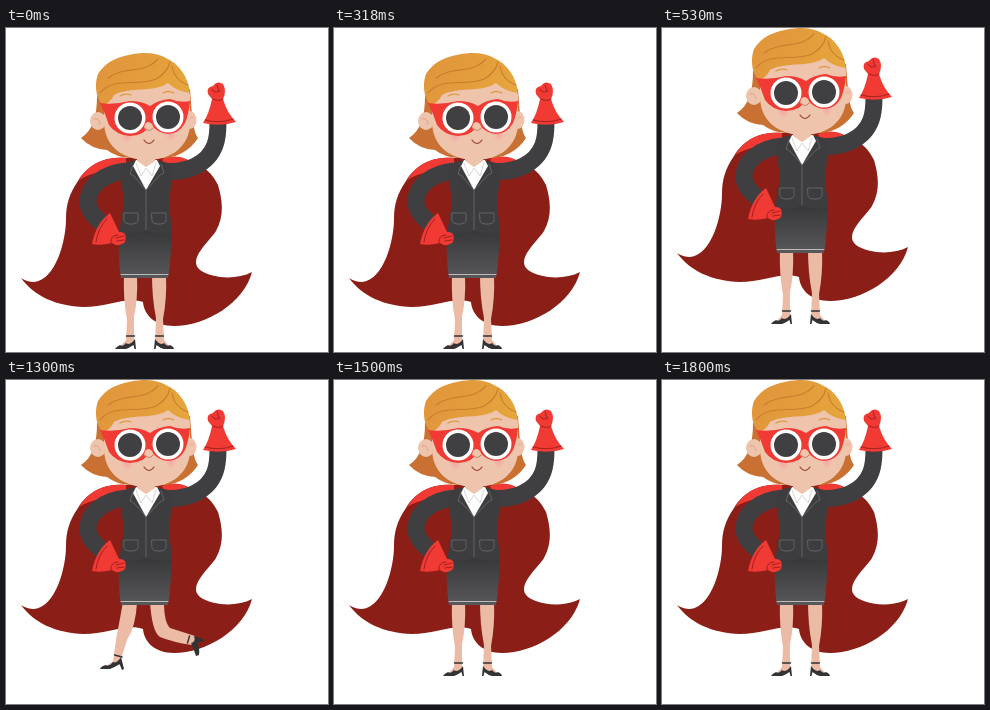
An HTML page without scripts for the animation above (2000 ms loop, 322 by 324 pixels).

```html
<!DOCTYPE html>
<html lang="en">
<head>
<meta charset="utf-8">
<title>Caped heroine</title>
<style>
  html, body { margin: 0; width: 100%; height: 100%; overflow: hidden; background: #fff; }
  svg { display: block; width: 322px; height: 324px; }
  .hero { animation: jump 2s step-end infinite; }
  .stand { animation: stand 2s step-end infinite; }
  .stride { animation: stride 2s step-end infinite; }
  @keyframes jump { 0% { transform: translateY(25px); } 26.5%, 100% { transform: none; } }
  @keyframes stand { 0%, 75%, 100% { visibility: visible; } 50% { visibility: hidden; } }
  @keyframes stride { 0%, 75%, 100% { visibility: hidden; } 50% { visibility: visible; } }
  .skin { fill: #efc4ac; }
  .leg { fill: #ecbba6; }
  .suit { fill: #3d3d3f; }
  .shoe { fill: #333335; }
  .red { fill: #f03a33; }
  .sleeve { fill: none; stroke: #3f3f41; stroke-width: 17; }
  .line { fill: none; stroke-linecap: round; stroke-linejoin: round; }
  .seam { stroke: #6c6c6f; stroke-width: .8; }
  .fold { stroke: #a3211f; stroke-width: 1; }
  .strand { stroke: #c97d2c; stroke-width: 1.1; }
  .strap { stroke: #333335; stroke-width: 1.4; }
</style>
</head>
<body>
<svg viewBox="0 0 322 324">
  <defs>
    <linearGradient id="skirt" x2="0" y2="1">
      <stop offset=".1" stop-color="#39393b"/>
      <stop offset="1" stop-color="#58585a"/>
    </linearGradient>
    <linearGradient id="hair" x2="1" y2=".3">
      <stop stop-color="#e0933c"/>
      <stop offset="1" stop-color="#e5a43c"/>
    </linearGradient>
    <radialGradient id="blush">
      <stop stop-color="#f3a3a8"/>
      <stop offset="1" stop-color="#efc4ac" stop-opacity="0"/>
    </radialGradient>
    <g id="lens">
      <circle r="15.500" fill="#fff"/>
      <circle r="12" fill="#404042"/>
    </g>
    <path id="pocket" class="line seam" d="M0 0H14V8Q13 11 9 11H5Q1 11 0 8Z"/>
  </defs>

  <g class="hero">
    <!-- cape -->
    <path fill="#8b1f18" d="M120 105C96 103 80 114 72 128C63 141 60 152 60 166C60 187 50 227 28 229Q21 229 15 225C28 243 50 253 78 254C100 254 122 243 137 249C138 262 149 273 168 273C200 273 238 250 246 219C231 227 207 226 194 217C181 206 204 188 210 178C219 162 216 146 212 132C204 115 188 105 162 104Z"/>
    <path class="red" d="M120 105C97 103 82 112 73 127C86 119 101 117 120 117ZM156 106C168 101 181 104 189 112L160 117Z"/>

    <!-- legs -->
    <g class="stand">
      <path class="leg" d="M118 222H131Q132 246 128 264L128 290L121 293L113 295L120 287L121 267Q117 245 118 222ZM146 222H160Q161 246 157 266L158 287L165 295L157 293L149 290L150 265Q146 245 146 222Z"/>
      <path class="shoe" d="M120 290Q124 293 129 286L130 296H128.500L127.500 292Q123 295 120 296H109Q110 294 114 292Q117 294 120 290ZM149 286Q154 293 158 290Q161 294 164 292Q168 294 168 296H158Q154 295 150.500 292L149.500 296H148Z"/>
      <path class="line strap" d="M120.500 283H128.500M149.500 283H157.500"/>
    </g>
    <g class="stride">
      <path class="leg" d="M117 222H131Q130 246 121 260L115 279L114 285L104 288L98 288L107 281L110 260ZM144 222H158Q158 242 164 248L189 256L191 266L186 265Q166 262 154 257Q146 252 144 222Z"/>
      <path class="shoe" d="M107 282Q111 284 115 277L118 289L116 290L113.500 284Q109 287 104 289L94 289Q95 286 100 285Q103 287 107 282ZM185 263Q190 262 188 256L197 259L198 261L191 263Q194 268 193 275L190 276Q188 270 185 263Z"/>
      <path class="line strap" d="M108.500 275L116 277M183.500 256L181.500 263"/>
    </g>

    <!-- body -->
    <path fill="url(#skirt)" d="M114 175Q111 200 115 225H162Q166 200 165 175Z"/>
    <path class="line" stroke="#bbbbbd" stroke-width="1" d="M115 221.500H162"/>
    <path class="sleeve" d="M120 118C98 120 82 133 82 149C82 157 88 164 97 171"/>
    <path class="sleeve" stroke-width="15" d="M155 118C181 121 202 111 209 92Q212 84 212 69"/>
    <path class="suit" d="M126 108Q117 109 114 117L118 150L113 180Q128 183 140 177Q153 183 166 180L163 150L167 114Q162 109 153 108Z"/>
    <path fill="#fff" d="M130 107L127 113L140 137L154 113L151 107Z"/>
    <path class="skin" d="M131 100H149V108L140 114L131 108Z"/>
    <path class="line" stroke="#c9c9cb" stroke-width=".8" d="M130 110L135 123L140 115L146 123L150 110"/>
    <path class="line seam" d="M127 112L124 121L128 123L140 137L154 122L158 120L155 111M140 137V177"/>
    <use href="#pocket" x="118" y="160"/>
    <use href="#pocket" x="146" y="160"/>

    <!-- gloves -->
    <path class="red" d="M104 160Q90 170 86 191Q95 193 106 190Q113 195 119 189Q122 178 113 179Z"/>
    <path class="line fold" d="M101 166Q92 175 90 189M105 190Q104 182 112 182M110 185L118 183M111 188L118 187"/>
    <path class="red" d="M206 46Q203 61 197 70Q214 74 230 69Q221 60 217 46Q221 38 217 31Q211 27 207 33Q200 34 202 41Z"/>
    <path class="line fold" d="M199 67Q214 71 227 66M207 46Q213 49 217 46M206 36Q208 41 214 38M211 32L213 38"/>

    <!-- head -->
    <path fill="#c97033" d="M91 43C91 63 87 77 75 85Q85 96 101 97Q110 104 124 105H160Q181 102 192 85C187 78 186 63 184 36Z"/>
    <ellipse class="skin" cx="92" cy="68" rx="8" ry="9"/>
    <ellipse class="skin" cx="184" cy="67" rx="6.500" ry="9"/>
    <path class="line" stroke="#dfa387" stroke-width="1" d="M88 66Q93 64 94 71M187 64Q183 64 183 69"/>
    <path class="skin" d="M98 44L112 28H180L184 42V70C184 93 165 107 142 107C117 107 99 94 98 70Z"/>
    <path fill="url(#hair)" d="M97 52C90 46 88 32 92 21C98 12 104 8 112 5C126 0 147-3 160 5C173 11 182 23 184 40Q170 38 162 30C148 40 125 33 108 42Q104 50 97 52Z"/>
    <path class="line strand" d="M94 40C108 23 132 34 150 26Q161 20 164 9M102 25C120 12 137 22 152 6M166 13Q168 27 182 32"/>
    <path class="line" stroke="#dc9a45" stroke-width="1.3" d="M114 43Q119 40 125 42M157 40Q162 37 168 40"/>
    <circle cx="165" cy="82" r="8" fill="url(#blush)"/>
    <circle cx="121" cy="84" r="8" fill="url(#blush)"/>
    <path class="red" d="M94 50Q108 52 124 48Q136 48 144 53Q152 47 164 46Q174 50 184 48Q183 60 179 70Q173 81 162 81Q151 80 145 71Q138 83 124 83Q110 82 103 72Q99 60 94 50Z"/>
    <use href="#lens" x="124" y="65"/>
    <use href="#lens" x="162" y="64"/>
    <path class="skin" d="M138 75Q139 68 143 69Q148 71 147 76Q143 80 138 75Z"/>
    <path class="line" stroke="#c9806a" stroke-width="1.1" d="M139 75Q143 80 147 75"/>
    <path class="line" stroke="#9c4a3a" stroke-width="1.2" d="M138 87Q143 94 148 87"/>
  </g>
</svg>
</body>
</html>
```
